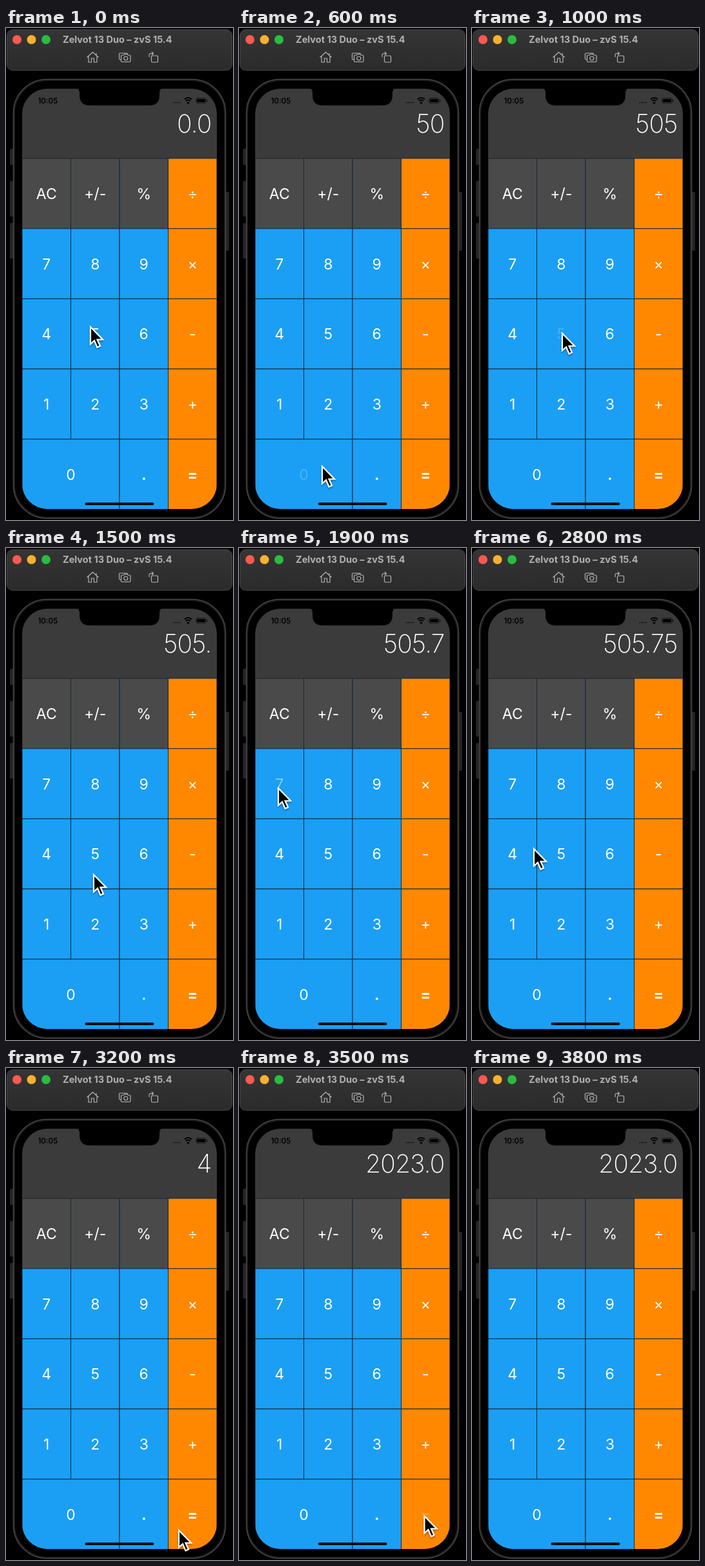
Write an HTML page that moves like this. It is 352 px wide and 762 px high and loops after 4400 ms.

```html
<!DOCTYPE html>
<html lang="en">
<head>
<meta charset="utf-8">
<title>Calculator</title>
<style>
  html, body { margin: 0; width: 100%; height: 100%; overflow: hidden; background: #000; }
  svg { display: block; font-family: Inter, "Open Sans", sans-serif; }
  #keys text { font-size: 23px; fill: #fff; text-anchor: middle; }
  #keys rect { stroke: #14283a; stroke-width: 1; }
  #icons { fill: none; stroke: #b4b4b4; stroke-width: 1.2; stroke-linejoin: round; }
  #display { font-size: 39px; font-weight: 200; fill: #fff; text-anchor: end; letter-spacing: -.8px; }
</style>
</head>
<body>
<svg width="352" height="762" viewBox="0 0 352 762">
  <defs>
    <clipPath id="screen"><rect x="25" y="94" width="302" height="651" rx="39"/></clipPath>
    <linearGradient id="bar" x2="0" y2="1">
      <stop stop-color="#353535"/><stop offset="1" stop-color="#2b2b2b"/>
    </linearGradient>
    <filter id="shadow" x="-50%" y="-50%" width="200%" height="200%">
      <feDropShadow dx="0" dy="1.5" stdDeviation="1.5" flood-opacity=".45"/>
    </filter>
  </defs>
  <rect width="352" height="762"/>

  <rect x="1.5" y="2.5" width="349" height="63" rx="9" fill="url(#bar)" stroke="#484848"/>
  <circle cx="17" cy="18" r="7" fill="#fe5850"/>
  <circle cx="39.5" cy="18" r="7" fill="#fcb02e"/>
  <circle cx="62" cy="18" r="7" fill="#29bd40"/>
  <text x="88" y="23" font-size="14.5" font-weight="700" fill="#b2b2b2">Zelvot 13 Duo – zvS 15.4</text>
  <g id="icons">
    <path d="M125.5 45.5L134.5 37.5L143.500 45.5M128 44V53H132.500V47H136.500V53H141V44M140 42V39"/>
    <path d="M178 49H177Q175.500 49 175.500 47.500V40.500Q175.500 39 177 39H187Q188.500 39 188.500 40.500"/>
    <path d="M180 42H182.500L183.500 40.500H188L189 42H191.500Q193 42 193 43.500V51Q193 52.500 191.500 52.500H180Q178.500 52.500 178.500 51V43.500Q178.500 42 180 42Z"/>
    <circle cx="185.800" cy="47" r="3"/>
    <rect x="225.500" y="43" width="10" height="10" rx="1.500"/>
    <path d="M222 45V42Q222 39.500 224.500 39.500H228M226 37L228.500 39.500L226 42"/>
  </g>

  <g fill="#242424">
    <rect x="6" y="187" width="6" height="25" rx="1.5"/>
    <rect x="6" y="237" width="6" height="55" rx="1.5"/>
    <rect x="6" y="302" width="6" height="55" rx="1.5"/>
    <rect x="340" y="254" width="6" height="91" rx="1.5"/>
  </g>
  <rect x="11.5" y="79.500" width="329" height="680" rx="52" fill="#1b1b1b" stroke="#484848" stroke-width="1.5"/>
  <rect x="14" y="82" width="324" height="675" rx="50"/>

  <g clip-path="url(#screen)">
    <rect x="25" y="94" width="302" height="109" fill="#3b3b3b"/>
    <g id="keys"></g>
  </g>
  <path d="M108 93Q114 94 114 100V104Q114 120 130 120H222Q238 120 238 104V100Q238 94 244 93Z"/>
  <text x="49.500" y="117" font-size="11.5" font-weight="600">10:05</text>
  <path d="M259 115.500H271" stroke="#111" stroke-width="1.500" stroke-dasharray="2 1.3"/>
  <g fill="none" stroke="#000" stroke-width="2">
    <path d="M276.800 110.500Q282.500 105.500 288.200 110.500M279 113Q282.500 110 286 113"/>
    <path d="M281 115L282.500 116.500L284 115"/>
  </g>
  <rect x="294.500" y="108.500" width="16" height="8" rx="2.5" fill="none" stroke="#181818"/>
  <rect x="296" y="110" width="13" height="5" rx="1"/>
  <path d="M312 111V114" stroke="#181818" stroke-width="1.5"/>
  <text id="display" x="318.500" y="162"></text>
  <rect x="122.500" y="735" width="107" height="4" rx="2" fill="#090909"/>

  <path id="cursor" d="M1 2V28.500L7 23L11.500 33.500L16 31.500L11.500 21.500H20Z" stroke="#fff" stroke-width="2.2" filter="url(#shadow)"/>
</svg>
<script>
const LOOP = 4400, STEP = 100;
const $ = id => document.getElementById(id);
const labels = {};

function add(tag, attrs, text = '') {
  const node = document.createElementNS('http://www.w3.org/2000/svg', tag);
  for (const name in attrs) node.setAttribute(name, attrs[name]);
  node.textContent = text;
  $('keys').append(node);
  return node;
}

function addKey(label, row, col, span = 1) {
  const width = 75.5, height = 108.7;
  const x = 25 + col * width, y = 202 + row * height;
  const fill = col === 3 ? '#ff8800' : row ? '#1a9ff5' : '#4a4a4a';
  add('rect', { x, y, width: width * span, height, fill });
  const bold = label === '=' || label === '.';
  labels[label] = add('text', {
    x: x + width * span / 2, y: y + 63, 'font-weight': bold ? 700 : 400
  }, label);
}

['AC +/- % ÷', '7 8 9 ×', '4 5 6 -', '1 2 3 +'].forEach((keys, row) =>
  keys.split(' ').forEach((label, col) => addKey(label, row, col)));
addKey('0', 4, 0, 2);
addKey('.', 4, 2);
addKey('=', 4, 3);

// [time, key, display after the press]
const presses = [
  [100, '5', '5'], [600, '0', '50'], [1000, '5', '505'], [1300, '.', '505.'],
  [1800, '7', '505.7'], [2100, '5', '505.75'], [2500, '×', '505.75'],
  [2900, '4', '4'], [3500, '=', '2023.0']
];

// [time, x, y] of the pointer tip
const path = [
  [0, 130, 461], [200, 130, 463], [400, 122, 610], [500, 126, 684], [600, 128, 677],
  [700, 129, 672], [900, 138, 490], [1000, 139, 471], [1100, 160, 540], [1200, 202, 680],
  [1300, 205, 692], [1400, 182, 625], [1500, 135, 504], [1700, 65, 382], [1800, 58, 366],
  [1900, 60, 370], [2100, 136, 474], [2200, 145, 470], [2400, 288, 380], [2500, 289, 366],
  [2600, 284, 372], [2800, 95, 464], [2900, 62, 474], [3000, 72, 488], [3200, 267, 714],
  [3400, 285, 692], [3600, 288, 692], [3700, 314, 703]
];

function pointerAt(t) {
  const i = Math.max(1, path.findIndex(p => p[0] >= t));
  const [t0, x0, y0] = path[i - 1], [t1, x1, y1] = path[i];
  const k = (t - t0) / (t1 - t0);
  return [x0 + (x1 - x0) * k, y0 + (y1 - y0) * k];
}

function draw(now) {
  const t = Math.floor(now % LOOP / STEP) * STEP;
  let shown = '0.0';
  for (const label in labels) labels[label].setAttribute('opacity', 1);
  for (const [start, key, result] of presses) {
    if (t < start) break;
    shown = result;
    const age = t - start;
    if (age < 300) labels[key].setAttribute('opacity', 0.2 + age / 300 * 0.8);
  }
  $('display').textContent = shown;

  const visible = t <= 3700;
  $('cursor').style.display = visible ? '' : 'none';
  if (visible) $('cursor').setAttribute('transform', `translate(${pointerAt(t)})`);
}

const start = performance.now();
function tick() {
  draw(performance.now() - start);
  requestAnimationFrame(tick);
}
tick();
</script>
</body>
</html>
```
